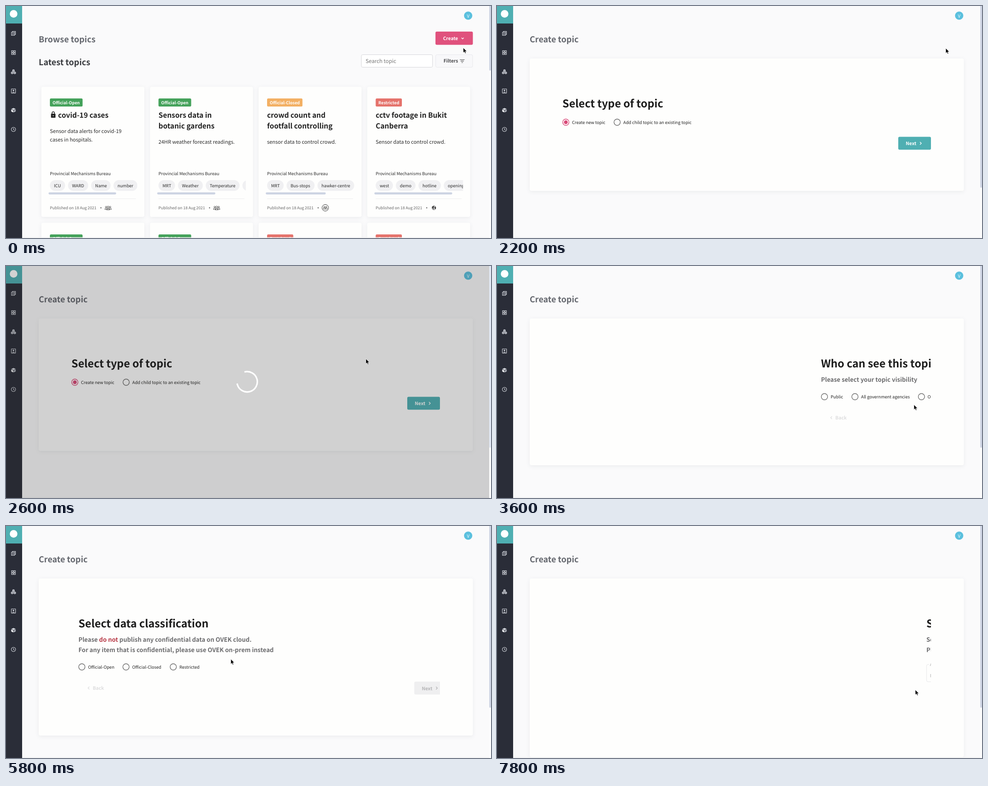
Recreate the animation shown at these times as an HTML page. Size 1083 by 517 pixels, loop 8000 ms.

```html
<!DOCTYPE html>
<html lang="en">
<head>
<meta charset="utf-8">
<title>Create topic</title>
<style>
  html, body { margin: 0; width: 100%; height: 100%; overflow: hidden; background: #fafafb; }
  svg { display: block; width: 100%; height: 100%; }
  text { font-family: "Noto Sans CJK JP", "Noto Sans CJK SC", "Noto Sans", sans-serif; text-rendering: geometricPrecision; white-space: pre; }
  .card { fill: #fefefd; filter: drop-shadow(0 2px 4px rgba(30, 40, 60, .07)); }
</style>
</head>
<body>
<svg id="stage" viewBox="0 0 1083 517"></svg>
<script>
const stage = document.getElementById('stage');
const LOOP = 8000, STEP = 200, SLIDE = 500, EXIT = 300, TRAVEL = 823;
const TEAL = '#4fafb2', PINK = '#e0517d', GREEN = '#45a25b', ORANGE = '#f3b064', RED = '#e5736c';
const AGENCY = 'Provincial Mechanisms Bureau';

const ease = p => { p = Math.max(0, Math.min(1, p)); return p * p * (3 - 2 * p); };

// Drawing helpers
const rect = (x, y, w, h, fill, r = 0, extra = '') =>
  `<rect x="${x}" y="${y}" width="${w}" height="${h}" rx="${r}" fill="${fill}" ${extra}/>`;
const circle = (x, y, r, fill, extra = '') => `<circle cx="${x}" cy="${y}" r="${r}" fill="${fill}" ${extra}/>`;
const line = (d, color, width = 1.2) =>
  `<path d="${d}" fill="none" stroke="${color}" stroke-width="${width}"/>`;
const shape = (d, fill) => `<path d="${d}" fill="${fill}"/>`;
const group = (x, y, body) => `<g transform="translate(${x} ${y})">${body}</g>`;
const text = (x, y, body, size, color = '#2b2b2b', extra = '') =>
  `<text x="${x}" y="${y}" font-size="${(size / 1.118).toFixed(2)}" fill="${color}" ${extra}>${body}</text>`;
const bold = (x, y, body, size, color = '#222') =>
  `<text x="${x}" y="${y}" font-size="${(size / 1.14).toFixed(2)}" font-weight="600" fill="${color}">${body}</text>`;
const chevron = (x, y, dir, color) =>
  line(`M${x - 1.5 * dir} ${y - 3}l${3 * dir} 3l${-3 * dir} 3`, color, 1.4);

function sidebar() {
  const c = '#d9dce2', ring = `stroke="${c}" stroke-width="1.1"`;
  const icons = [
    line('M-4.5 -2.5H2.5V4.5H-4.5ZM-2.5 -2.5V-4.5H4.5V2.5H2.5M-3 0H1M-3 2.2H1', c, 1.1),
    [[-4.3, -4.3], [.8, -4.3], [-4.3, .8], [.8, .8]].map(([x, y]) => rect(x, y, 3.5, 3.5, 'none', 0, ring)).join(''),
    [[0, -2.6], [-2.9, 2.3], [2.9, 2.3]].map(([x, y]) => circle(x, y, 2.1, '#8d919b', ring)).join(''),
    rect(-4.7, -4.7, 9.4, 9.4, 'none', .5, ring) + circle(0, -1.2, 1.6, c) + shape('M-3 3.3Q0 .2 3 3.3Z', c),
    shape('M0 -5L5 -2.6L0 -.2L-5 -2.6Z', c) + shape('M-5 -1.6L-.4 .7V5L-5 2.7Z', '#f2f3f5') + shape('M5 -1.6L.4 .7V5L5 2.7Z', '#a9adb6'),
    circle(0, 0, 4.8, 'none', ring) + line('M0 -3V.2L2.2 1.6', c, 1.1)
  ];
  return rect(0, 0, 36, 517, '#2a2d38') + rect(0, 0, 36, 39, TEAL) + circle(17, 17.5, 8.5, '#fff') +
    icons.map((icon, i) => group(16.7, 61 + i * 42.8, icon)).join('');
}

const frameParts = (thumb, thumbColor) =>
  rect(36, 515.5, 1043, 1.5, '#f1f1f2') + rect(1079, 0, 4, 517, '#fdfdfd') +
  rect(1079, -4, 4, thumb + 4, thumbColor, 2) +
  circle(1032, 21.5, 9.3, '#5bc0de') + text(1032, 25.5, 'V', 11, '#fff', 'text-anchor="middle"');

// Topic list
const badges = {
  open: ['Official-Open', GREEN, 73], closed: ['Official-Closed', ORANGE, 79], restricted: ['Restricted', RED, 58.5]
};
function badge(kind, y) {
  const [label, color, width] = badges[kind];
  return rect(0, y, width, 18, color, 2.5) + bold(6, y + 13, label, 10.6, '#fff');
}

const person = (x, y, s) => circle(x, y - 2.2 * s, 1.8 * s, 'none', 'stroke="#444" stroke-width=".9"') +
  line(`M${x - 3 * s} ${y + 3.6 * s}q0 -3.4 ${3 * s} -3.4t${3 * s} 3.4Z`, '#444', .9);
const people = person(-4.4, .3, .95) + person(4.4, .3, .95) + person(0, .6, 1.1);
const shared = circle(0, 0, 7.3, 'none', 'stroke="#333" stroke-width="1"') + person(-2.2, 0, .8) + person(2.2, 0, .8);
const globe = circle(0, 0, 4.4, '#fff', 'stroke="#333" stroke-width=".8"') +
  shape('M-4 -2L-1 -4L1 -2L-1 0L0 2L-1 4L-3 1ZM2 -3L4 -1L4 2L2 3L1 0Z', '#333');

// starts: left edge of each tag, with one closing value
const topics = [
  { kind: 'open', title: ['covid-19 cases'], lock: true, about: ['Sensor data alerts for covid-19', 'cases in hospitals.'],
    tags: ['ICU', 'WARD', 'Name', 'number'], starts: [0, 40.5, 92, 142, 202], thumb: 151, icon: people, below: 'open' },
  { kind: 'open', title: ['Sensors data in', 'botanic gardens'], about: ['24HR weather forecast readings.'],
    tags: ['MRT', 'Weather', 'Temperature', ''], starts: [0, 43.5, 105.5, 187.5, 240], thumb: 130, icon: people, below: 'open' },
  { kind: 'closed', title: ['crowd count and', 'footfall controlling'], about: ['sensor data to control crowd.'],
    tags: ['MRT', 'Bus-stops', 'hawker-centre'], starts: [0, 43.5, 112.5, 201], thumb: 134, icon: shared, below: 'restricted' },
  { kind: 'restricted', title: ['cctv footage in Bukit', 'Canberra'], about: ['Sensor data to control crowd.'],
    tags: ['west', 'demo', 'hotline', 'opening'], starts: [0, 45, 95.5, 152, 215], thumb: 174, icon: globe, below: 'restricted' }
];
const lockIcon = rect(2.5, 240, 10, 9, '#222', 1) + line('M4.8 240.5V238.5a2.7 2.7 0 0 1 5.4 0V240.5', '#222', 1.5) +
  circle(7.5, 244.5, 1.1, '#fff');

function topicCard(topic, i) {
  const aboutTop = topic.title.length > 1 ? 306.5 : 283;
  const tags = topic.tags.map((tag, k) => {
    const x = topic.starts[k];
    return rect(x, 388, topic.starts[k + 1] - x - 6.5, 24, '#f0f0f2', 12) + text(x + 9, 404, tag, 10.67);
  }).join('');
  return group(98 + i * 242.5, 0,
    rect(-19, 180, 230, 290, '', 4, 'class="card"') + rect(-19, 483, 230, 60, '', 4, 'class="card"') +
    badge(topic.kind, 206) + badge(topic.below, 509) + (topic.lock ? lockIcon : '') +
    topic.title.map((s, k) => bold(topic.lock ? 18.3 : 0, 249 + k * 23.5, s, 18.1)).join('') +
    topic.about.map((s, k) => text(0, aboutTop + k * 19, s, 12.7)).join('') +
    text(0, 377.3, AGENCY, 10.67) + `<g clip-path="url(#tags)">${tags}</g>` +
    rect(-3, 415.3, topic.thumb, 4.6, '#cdd4e3', 2.3) + rect(0, 429, 192, 1, '#eeeeef') +
    text(0, 453, 'Published on 18 Aug 2021', 9.77, '#666') + circle(114, 449.7, 1.2, '#555') +
    group(130, 449.7, topic.icon));
}

const listPage = () =>
  bold(73, 81, 'Browse topics', 21, '#65686f') + bold(73, 131.7, 'Latest topics', 21, '#3a3c40') +
  rect(959, 57, 83.5, 29.5, PINK, 3) + bold(976, 76, 'Create', 11.9, '#fff') + line('M1017 70.7l2.6 2.6l2.6 -2.6', '#fff', 1.3) +
  rect(793.5, 108.5, 159, 28, '#fff', 3, 'stroke="#d6d6da"') + text(803, 127.3, 'Search topic', 13.2, '#757575') +
  rect(959.5, 108.5, 82.5, 28, '#f8f8fa', 3, 'stroke="#e8e8ec"') + bold(977, 126.3, 'Filters', 11.9, '#4a4a4d') +
  line('M1013.5 119.5H1024M1015.2 122.7H1022.3M1017 126H1020.5', '#444', 1.2) +
  topics.map(topicCard).join('');

// Wizard
const radio = (x, y, label, on, halo) =>
  (halo ? circle(x, y, 14.7, '#f9dfe8') : '') +
  circle(x, y, 7, on ? '#fff' : 'none', `stroke="${on ? '#d94a78' : '#6b6b6b'}" stroke-width="1.4"`) +
  (on ? circle(x, y, 4.3, '#d94a78') : '') + text(x + 13.8, y + 3.6, label, 10.67, '#222');

const nextButton = (y, on) => {
  const ink = on ? '#fff' : '#b4b4b6';
  return rect(896, y, 73, 28.7, on ? TEAL : '#efeff0', 3) + bold(912.7, y + 18.7, 'Next', 11.9, ink) +
    chevron(946, y + 14.4, 1, ink);
};
const backButton = y => bold(178, y + 4.3, 'Back', 12, '#dededf') + chevron(169, y, -1, '#dededf');
const heading = s => bold(146, 226, s, 27.2, '#1d1d1d');
const subtitle = (s, y) => bold(146, y, s, 15.3, '#6c6c6e');

const panels = [
  { enter: -1e4, bottom: 412, draw: () => heading('Select type of topic') +
      radio(153.7, 259, 'Create new topic', true) + radio(268.3, 259, 'Add child topic to an existing topic') +
      nextButton(291.5, true) },
  { enter: 3419, bottom: 444, draw: t => {
      const picked = t >= 4400;
      return heading('Who can see this topic?') + subtitle('Please select your topic visibility', 258) +
        radio(153.7, 291.3, 'Public') + radio(221.8, 291.3, 'All government agencies', picked, picked) +
        radio(370.3, 291.3, 'Only my agency') + radio(481, 291.3, 'Only my team') + radio(582.8, 291.3, 'Only me') +
        backButton(338) + nextButton(323.5, picked);
    } },
  { enter: 5341, bottom: 467, draw: t => {
      const picked = t >= 6400;
      return heading('Select data classification') +
        subtitle('Please <tspan fill="#b83a47">do not</tspan> publish any confidential data on OVEK cloud.', 258) +
        subtitle('For any item that is confidential, please use OVEK on-prem instead', 281) +
        radio(153.7, 314, 'Official-Open', picked, picked) + radio(252.3, 314, 'Official-Closed') + radio(357.8, 314, 'Restricted') +
        backButton(361) + nextButton(346.8, picked);
    } },
  { enter: 7767, bottom: 515, draw: () => heading('Select') + subtitle('Select', 258) + subtitle('Please', 281) +
      line('M152 308.5H150Q146.5 308.5 146.5 311.5V344Q146.5 347 150 347H200', '#e6e6e8', 1) +
      text(154, 312, 'A', 9, '#999') + text(154, 337, 'E', 10.67, '#aaa') }
];

function wizardPage(t) {
  const index = panels.findLastIndex(p => t >= p.enter);
  const panel = panels[index], next = panels[index + 1];
  const entering = (1 - ease((t - panel.enter) / SLIDE)) * TRAVEL;
  const leaving = next ? ease((t - next.enter + EXIT) / EXIT) * TRAVEL : 0;
  return bold(73, 81, 'Create topic', 21, '#65686f') +
    rect(73, 117, 969.5, panel.bottom - 117, '', 4, 'class="card"') +
    `<g clip-path="url(#panel)">${group((entering - leaving).toFixed(1), 0, panel.draw(t))}</g>`;
}

const loader = t => rect(0, 0, 1079, 517, 'rgba(33,33,33,.2)') +
  `<circle r="22.7" fill="none" stroke="#fff" stroke-width="3.4" pathLength="360" stroke-dasharray="276 84"
    transform="translate(538.5 258) rotate(${203 + (t - 2400) * 360 / 1400})"/>`;

// Pointer: time, x, y
const pointerPath = [
  [0, 1021, 93], [400, 1003, 76], [1000, 1003, 76], [1600, 1002, 94], [2200, 1002, 94], [2400, 759, 171],
  [3000, 931, 309], [3600, 931, 309], [4200, 223, 293], [4600, 223, 293], [5000, 897, 348], [5200, 897, 348],
  [5800, 502, 296.5], [6200, 155, 314], [6600, 155, 314], [7200, 934, 365], [8000, 934, 365]
];
function pointer(t) {
  const i = pointerPath.findLastIndex(k => k[0] <= t);
  const [t0, x0, y0] = pointerPath[i], [t1, x1, y1] = pointerPath[i + 1];
  const p = ease((t - t0) / (t1 - t0));
  return group(x0 + (x1 - x0) * p, y0 + (y1 - y0) * p,
    '<path d="M0 0V11.3L2.6 8.9L4.3 12.8L6.2 12L4.6 8.2H8Z" fill="#000" stroke="#fff" stroke-width=".8"/>');
}

const defs = `<defs><clipPath id="tags">${rect(-1, 380, 196, 40, '#000')}</clipPath>
  <clipPath id="panel">${rect(145.5, 117, 823.5, 400, '#000')}</clipPath></defs>`;

function draw(t) {
  const onList = t < 2000, loading = t >= 2400 && t < 2800;
  stage.innerHTML = defs + rect(0, 0, 1083, 517, '#fafafb') +
    (onList ? listPage() : wizardPage(t)) + sidebar() +
    frameParts(onList ? 144 : 405, loading ? '#e2e8f4' : '#cfd5e4') +
    (loading ? loader(t) : '') + pointer(t);
}

let shown = -1;
function tick() {
  const t = Math.floor(performance.now() % LOOP / STEP) * STEP;
  if (t !== shown) draw(shown = t);
  requestAnimationFrame(tick);
}
tick();
</script>
</body>
</html>
```
